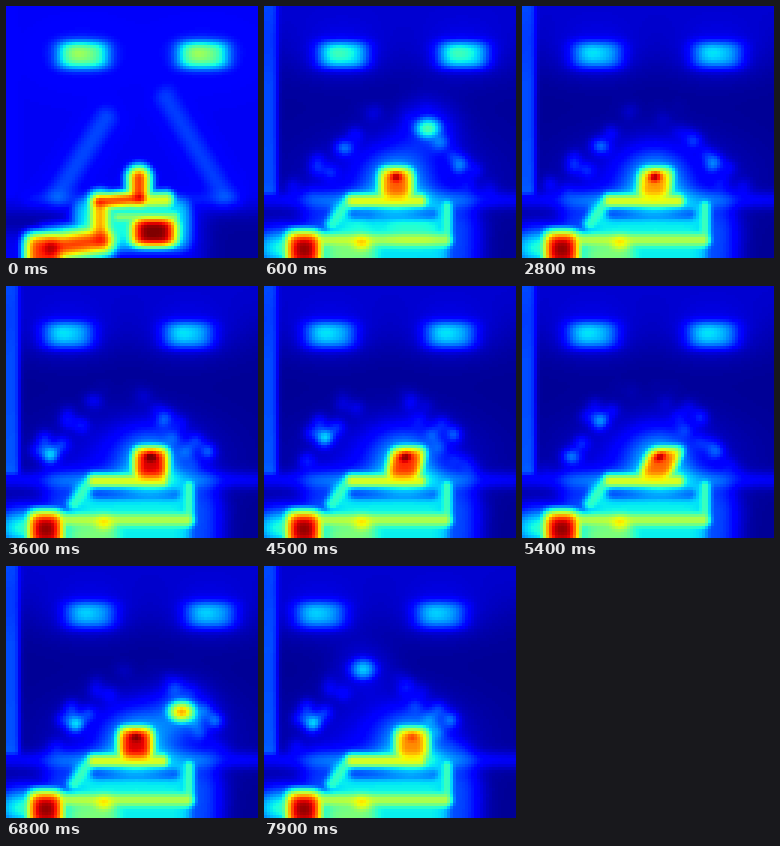
Recreate the animation shown at these times as a matplotlib script. Size 252 by 252 pixels, loop 8000 ms.

```python
import numpy as np
import matplotlib.pyplot as plt
from matplotlib.animation import FuncAnimation

SIZE, CELLS, FRAMES, STEP = 252, 84, 80, 100

axis = (np.arange(CELLS) + 0.5) * SIZE / CELLS
X, Y = np.meshgrid(axis, axis)

# Poses over time (seconds)
TIMES = [0, 1.4, 2.8, 3.6, 5.4, 6.8, 7.9]
HILLS = [137, 142, 135, 122, 130, 144, 116]
HILL_HEAT = [0.36, 0.22, 0.24, 0.24, 0.24, 0.22, 0.22]
CAR_X = [133, 131, 133, 145, 138, 130, 148]
BODY_HEAT = [0.90, 0.66, 0.74, 0.92, 0.80, 0.92, 0.76]
ROOF_HEAT = [0.90, 0.93, 0.93, 0.95, 0.90, 0.88, 0.74]
CAR_TILT = [0, 0, 0.1, 0, 0.4, 0, 0]

# Rivals: time when nearest, lane offset there, top heat
RIVALS = [(1.48, 62, 0.62), (7.35, 61, 0.72), (9.1, -36, 0.75)]

# Road texture: start along the edge, sideways offset, strength
rng = np.random.default_rng(4)
FLECKS = [(rng.random(), rng.normal(0, 9), rng.uniform(0.04, 0.11), side)
          for side in (-1, 1) for _ in range(14)]


def ease(a, b, t):
    u = np.clip((t - a) / (b - a), 0, 1)
    return u * u * (3 - 2 * u)


def pose(values, t):
    i = min(np.searchsorted(TIMES, t, side="right") - 1, len(TIMES) - 2)
    return values[i] + (values[i + 1] - values[i]) * ease(TIMES[i], TIMES[i + 1], t)


def blob(cx, cy, sx, sy, heat=1.0, tilt=0.0):
    dx = X - cx + tilt * (Y - cy)
    return heat * np.exp(-(dx / sx) ** 2 - ((Y - cy) / sy) ** 2)


def slab(cx, cy, sx, sy, heat=1.0, tilt=0.0):
    """Rounded rectangle with soft sides."""
    dx = X - cx + tilt * (Y - cy)
    return heat * np.exp(-np.abs(dx / sx) ** 3.5 - np.abs((Y - cy) / sy) ** 3.5)


def box(x0, x1, y0, y1, heat=1.0, soft=3.0):
    def edge(d):
        return 1 / (1 + np.exp(-np.clip(d / soft, -40, 40)))
    return heat * edge(X - x0) * edge(x1 - X) * edge(Y - y0) * edge(y1 - Y)


def stroke(x0, y0, x1, y1, width, heat):
    dx, dy = x1 - x0, y1 - y0
    u = np.clip(((X - x0) * dx + (Y - y0) * dy) / (dx * dx + dy * dy), 0, 1)
    d2 = (X - x0 - u * dx) ** 2 + (Y - y0 - u * dy) ** 2
    return heat * np.exp(-d2 / width ** 2)


def merge(*layers):
    """Smooth maximum."""
    return sum(np.maximum(layer, 0) ** 6 for layer in layers) ** (1 / 6)


def hills(t):
    mid, heat = pose(HILLS, t), pose(HILL_HEAT, t)
    out = np.zeros_like(X)
    for cx in (mid - 60, mid + 60):
        out += slab(cx, 49, 26, 14, heat * 0.85)
        out += blob(cx - 5, 47, 13, 9, heat * 0.2)
        out += blob(cx, 47, 42, 26, 0.06)
    return out


def flecks(t):
    shift = pose(HILLS, t) - 137
    out = blob(132 + shift * 0.5, 170, 82, 42, 0.08)
    for start, offset, heat, side in FLECKS:
        u = (start + 0.9 * t) % 1
        x = 130 + side * (16 + 76 * u) + offset + shift * (1 - 0.35 * u)
        out += blob(x, 98 + 90 * u, 8, 8, heat * min(2 * u, 1) * min(6 - 6 * u, 1))
    return out


def rivals(t):
    shift = pose(HILLS, t) - 137
    core, glow = np.zeros_like(X), np.zeros_like(X)
    for near, lane, heat in RIVALS:
        u = 1 - (near - t) / 1.4
        if 0 < u < 1.15:
            y = 95 + 95 * u ** 1.25
            x = 130 + lane * (0.25 + 0.75 * u) + shift * (1 - u)
            fade = (0.42 + 0.58 * ease(0.1, 0.6, u)) * ease(0, 0.12, u)
            fade *= 1 - ease(1, 1.15, u)
            core += blob(x, y, 15 + 3 * u, 13, heat * fade)
            glow += blob(x, y, 28, 26, 0.16 * fade)
    return core, glow


def make_ground():
    out = 0.02 + 0.05 * np.exp(-(Y / 50) ** 2)
    out += box(-20, 13, -30, 188, 0.18, 1.5) * (0.7 + 0.3 * ease(20, 90, Y))
    out += box(-20, 275, 188, 200, 0.10, 3)
    out += box(-20, 222, 212, 280, 0.06, 5) + box(40, 210, 184, 275, 0.12, 5)
    return out


def make_panel():
    out = merge(
        box(64, 188, 192, 275, 0.36, 4),
        stroke(88, 195, 156, 195, 10, 0.62),
        stroke(82, 198, 68, 218, 11, 0.40),
        stroke(183, 200, 183, 234, 9, 0.42),
        stroke(60, 234, 180, 234, 11, 0.56),
        box(55, 118, 228, 275, 0.50, 5),
        blob(20, 242, 38, 22, 0.40),
    )
    return out - box(86, 172, 204, 212, 0.26, 2)


GROUND, PANEL = make_ground(), make_panel()
CORNER = slab(40, 244, 22, 22, 0.88) + blob(40, 243, 12, 14, 0.10)


def driving(t):
    spot = 0.62 + 0.12 * np.exp(-((t - 1.4) / 0.6) ** 2)
    x, tilt = pose(CAR_X, t), pose(CAR_TILT, t)
    core, glow = rivals(t)
    faint = GROUND + hills(t) + flecks(t) + glow
    return merge(
        faint + blob(x, 177, 32, 31, 0.26),
        PANEL, CORNER, core,
        slab(x, 178, 21, 20, pose(BODY_HEAT, t), tilt),
        blob(x, 171, 12, 10, pose(ROOF_HEAT, t), tilt),
        blob(98, 237, 18, 14, spot),
    )


def opening():
    faint = 0.105 + hills(0) + box(-20, 10, -30, 190, 0.015, 2)
    faint -= box(-30, 60, 205, 226, 0.08, 5) + box(198, 290, 204, 290, 0.08, 6)
    faint += stroke(100, 112, 52, 188, 13, 0.09) + stroke(160, 92, 218, 188, 13, 0.08)
    faint += box(20, 235, 188, 199, 0.06, 3)
    return merge(
        faint,
        box(66, 186, 190, 246, 0.38, 5),
        stroke(92, 196, 160, 194, 11, 0.62),
        stroke(94, 196, 134, 192, 10, 0.80),
        stroke(133, 172, 133, 190, 14, 0.84),
        stroke(94, 198, 94, 234, 15, 0.72),
        stroke(45, 242, 95, 234, 18, 0.84),
        slab(39, 246, 23, 21, 0.86),
        slab(148, 226, 27, 17, 1.0),
        stroke(112, 211, 168, 211, 8, 0.50),
    )


OPENING = opening()


def heat_map(frame):
    t = frame * STEP / 1000
    mix = ease(0, 0.7, t)
    return np.clip((1 - mix) * OPENING + mix * driving(t), 0, 1)


fig = plt.figure(figsize=(SIZE / 100, SIZE / 100), dpi=100)
ax = fig.add_axes([0, 0, 1, 1])
ax.axis("off")
image = ax.imshow(heat_map(0), cmap="jet", vmin=0, vmax=1,
                  interpolation="nearest", aspect="auto")


def update(frame):
    image.set_data(heat_map(frame))
    return [image]


anim = FuncAnimation(fig, update, frames=FRAMES, interval=STEP,
                     repeat=True, repeat_delay=0, blit=False)
plt.show()
```
